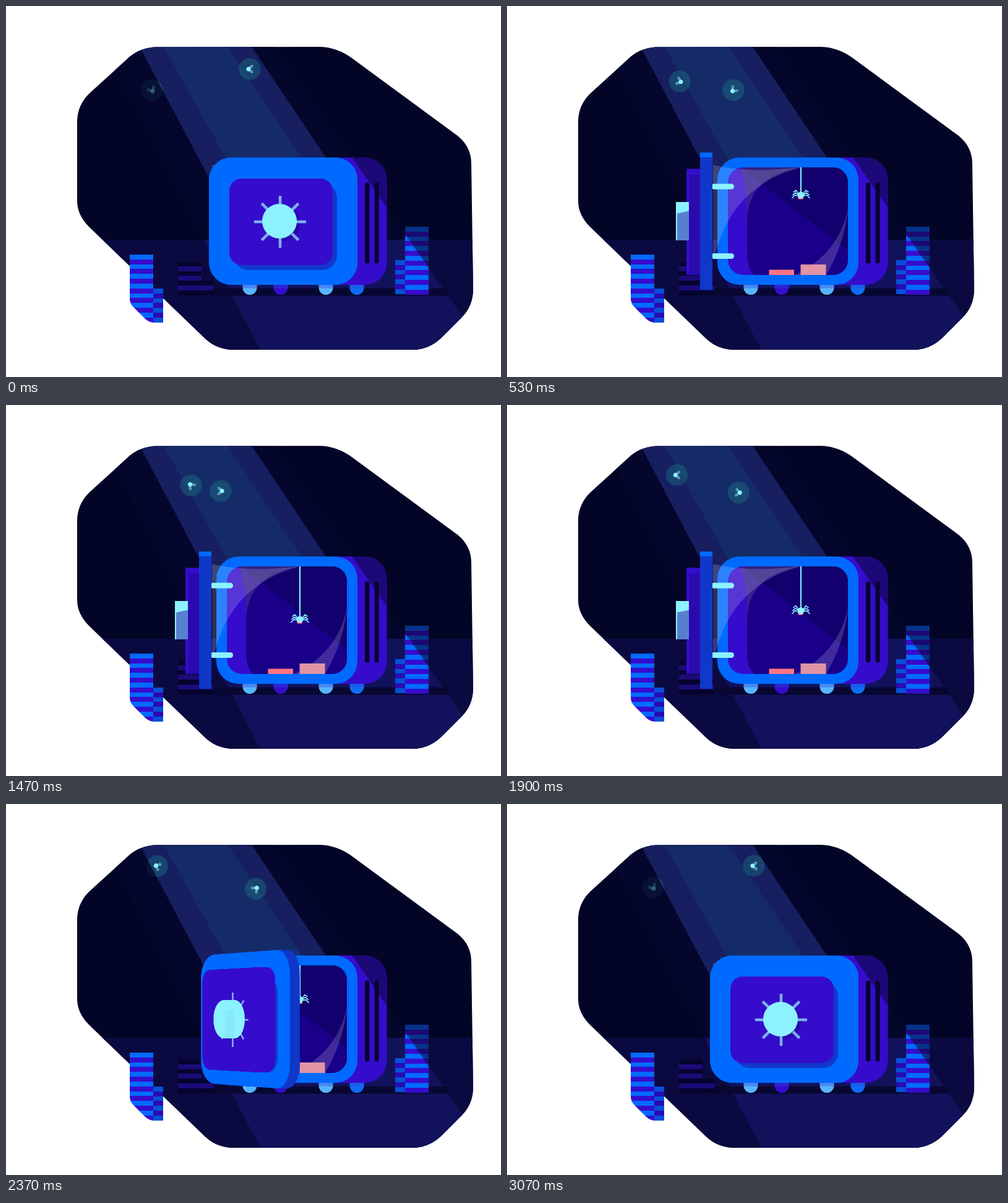
These frames come from a looping animation (800 by 600 pixels, 3100 ms). An HTML page with a canvas:

```html
<!DOCTYPE html>
<html>
<head>
<meta charset="utf-8">
<style>
html, body { margin: 0; width: 100%; height: 100%; overflow: hidden; background: #fff; }
canvas { display: block; }
</style>
</head>
<body>
<canvas id="stage" width="800" height="600"></canvas>
<script>
const ctx = document.getElementById('stage').getContext('2d');
const LOOP = 3100;
const BLUE = '#006aff', PURPLE = '#360ccc', CYAN = '#8cf2ff', NIGHT = '#05042f';

const ROOM = new Path2D('M243 66.5L508 66Q536 67 560 85L730 210Q752 228 752 255L755 460Q754 486 737 503' +
  'L703 537Q684 555 658 556H366Q340 555 322 538L134 357Q115 338 115 315V185Q116 160 134 142L200 82Q218 67 243 66.5Z');
const WIDE_BEAM = new Path2D('M157 66H435L775 556H411Z');
const BEAM = new Path2D('M216 66H397L606 378H381Z');
const CORE = new Path2D('M255 66H358L567 378H429Z');
const SHADE = new Path2D('M435 66L775 556H800V66Z');
const HOLE = new Path2D();
HOLE.roundRect(357, 261, 194, 174, 24);

function fill(path, color) {
  ctx.fillStyle = color;
  ctx.fill(typeof path === 'string' ? new Path2D(path) : path);
}

function box(x, y, w, h, color, r = 0) {
  ctx.fillStyle = color;
  ctx.beginPath();
  ctx.roundRect(x, y, w, h, r);
  ctx.fill();
}

function disc(x, y, r, color) {
  ctx.fillStyle = color;
  ctx.beginPath();
  ctx.arc(x, y, r, 0, 7);
  ctx.fill();
}

function clipped(path, draw) {
  ctx.save();
  ctx.clip(path);
  draw();
  ctx.restore();
}

function stack(x, y, w, rows, colors) {
  const h = 7.83;
  for (let i = 0; i < rows; i++) {
    const top = Math.round(y + i * h);
    box(x, top, w, Math.round(y + (i + 1) * h) - top, colors[i % 2]);
  }
}

// Smooth periodic curve through values at the key times
const KEYS = [0, 530, 930, 1470, 2240, 2570, 3070];
function curve(values, t) {
  const n = KEYS.length;
  const time = i => KEYS[(i + n) % n] + LOOP * Math.floor(i / n);
  const val = i => values[(i + n) % n];
  const slope = i => (val(i + 1) - val(i - 1)) / (time(i + 1) - time(i - 1));
  let i = n - 1;
  while (KEYS[i] > t) i--;
  const d = time(i + 1) - time(i), x = (t - time(i)) / d, y = 1 - x;
  return val(i) * (1 + 2 * x) * y * y + val(i + 1) * x * x * (3 - 2 * x) +
    d * x * y * (slope(i) * y - slope(i + 1) * x);
}

function ease(t, from, to) {
  const x = Math.min(1, Math.max(0, (t - from) / (to - from)));
  return x < .5 ? 4 * x ** 3 : 1 - 4 * (1 - x) ** 3;
}

const MOTHS = [
  { x: [236, 279, 313, 299, 253, 234, 236], y: [136, 122, 119, 130, 100, 108, 135],
    turn: [240, 200, 225, 45, 0, 90, 240] },
  { x: [394, 366, 338, 347, 397, 409, 399], y: [102, 136, 151, 139, 142, 125, 100],
    turn: [0, -45, 0, 180, 160, 90, 0] }
];

function moth(m, t) {
  ctx.save();
  ctx.translate(curve(m.x, t), curve(m.y, t));
  disc(0, 0, 17.6, 'rgba(30,115,130,.36)');
  ctx.rotate(curve(m.turn, t) * Math.PI / 180);
  for (const side of [-1, 1]) {
    fill(`M-2 0Q-1 ${side * 7} 5 ${side * 7}Q8 ${side * 2} -2 0Z`, '#5796b8');
  }
  disc(-2, 0, 3.5, CYAN);
  ctx.restore();
}

function background(t) {
  fill(ROOM, '#030527');
  clipped(ROOM, () => {
    fill(WIDE_BEAM, '#04062c');
    fill(BEAM, '#171f60');
    fill(CORE, '#152b68');
    box(100, 378, 700, 200, '#0a0a40');
    clipped(WIDE_BEAM, () => box(100, 378, 700, 200, '#12125c'));
    ctx.globalAlpha = .3;
    MOTHS.forEach(m => moth(m, t));
    ctx.globalAlpha = 1;
    clipped(BEAM, () => MOTHS.forEach(m => moth(m, t)));
  });
  box(278, 456.5, 436, 12, '#070731');
  const dim = ['#0550d8', '#2a0ab4'], dark = [NIGHT, '#1c0a78'];
  clipped(new Path2D('M200 402H238V512Q230 511 224 505L206 487Q200 481 200 473Z'),
    () => stack(200, 402, 38, 14, [BLUE, PURPLE]));
  stack(238, 457, 16, 7, dim);
  stack(278, 413, 38, 7, dark);
  stack(316, 444, 19, 3, dark);
  stack(629, 411, 16, 7, dim);
  stack(645, 357, 38, 14, [BLUE, PURPLE]);
  clipped(SHADE, () => box(645, 357, 38, 110, 'rgba(8,6,45,.55)'));
}

function spider(y) {
  ctx.strokeStyle = CYAN;
  ctx.lineWidth = 2;
  ctx.beginPath();
  ctx.moveTo(475, 261);
  ctx.lineTo(475, y);
  ctx.stroke();
  ctx.lineWidth = 1.6;
  ctx.beginPath();
  for (const side of [-1, 1]) {
    for (let i = 0; i < 3; i++) {
      ctx.moveTo(475 + side * 3, y + i - 1);
      ctx.lineTo(475 + side * (8 + i), y - 8 + 4 * i);
      ctx.lineTo(475 + side * (12.5 + i), y - 5 + 5 * i);
    }
  }
  ctx.stroke();
  box(470, y + 1, 9, 5.5, '#ff8e98', 3);
  disc(475, y - .5, 5.3, CYAN);
}

function safe(t) {
  [[394, '#58b4ff'], [444, PURPLE], [517, '#58b4ff'], [567, '#0f6cf5']].forEach(([x, color]) => {
    box(x - 11.5, 445, 23, 22, color, [0, 0, 11.5, 11.5]);
    box(x - 11.5, 450, 23, 6.5, 'rgba(40,70,220,.4)');
  });
  box(480, 245, 135.5, 206, PURPLE, 36);
  clipped(SHADE, () => box(480, 245, 135.5, 206, '#1d0878', 36));
  box(580, 285.5, 7.5, 131, NIGHT, 3.5);
  box(595.5, 285.5, 7, 131, NIGHT, 3.5);
  box(340, 245, 228, 206, BLUE, 36);
  clipped(HOLE, () => {
    fill(HOLE, PURPLE);
    fill('M376 261Q388 290 388 350V400Q388 425 400 436H552V261Z', '#1a0088');
    fill('M388 269L551 395V261H388Z', '#12006e');
    fill('M551 328Q536 402 463 436H515Q543 390 551 332Z', 'rgba(255,255,255,.17)');
    box(423.5, 426.5, 40.5, 9, '#ff7484');
    box(474.5, 418, 41, 17.5, '#e094a4');
    fill('M376 261H475Q388 275 388 350Q388 290 376 261Z', 'rgba(255,255,255,.12)');
    spider(curve([292, 306, 357, 347, 321, 310, 293], t));
  });
  fill('M333 257Q388 271 475 261Q365 290 337 400H333Z', 'rgba(255,255,255,.17)');
  box(330, 287.5, 37, 9, CYAN, 4.5);
  box(330, 400, 37, 9, CYAN, 4.5);
}

// The door is a set of flat plates: u runs from the hinge, v from the middle, z is depth.
function door(open) {
  const angle = 90 * open, s = Math.sin(angle * Math.PI / 180), c = Math.cos(angle * Math.PI / 180);
  const grow = Math.min(13 * s, 8 + 3.2 * (90 - angle)) / 103;
  const at = (u, v, z) => [328 + 4 * s + u * c - z * s, 348 + v * (1 + grow * u / 240)];

  function plate(u0, v0, u1, v1, r, z, color) {
    const k = r * .45, p = (u, v) => at(u, v, z);
    ctx.fillStyle = color;
    ctx.beginPath();
    ctx.moveTo(...p(u0 + r, v0));
    ctx.lineTo(...p(u1 - r, v0));
    ctx.bezierCurveTo(...p(u1 - k, v0), ...p(u1, v0 + k), ...p(u1, v0 + r));
    ctx.lineTo(...p(u1, v1 - r));
    ctx.bezierCurveTo(...p(u1, v1 - k), ...p(u1 - k, v1), ...p(u1 - r, v1));
    ctx.lineTo(...p(u0 + r, v1));
    ctx.bezierCurveTo(...p(u0 + k, v1), ...p(u0, v1 - k), ...p(u0, v1 - r));
    ctx.lineTo(...p(u0, v0 + r));
    ctx.bezierCurveTo(...p(u0, v0 + k), ...p(u0 + k, v0), ...p(u0 + r, v0));
    ctx.fill();
  }

  function solid(u0, v0, u1, v1, r, z0, z1, side, face) {
    if (s > .01) for (let z = z0; z < z1; z++) {
      plate(u0, v0, u1, v1, r, z, side);
      // keeps the body filled when seen edge-on
      if (c < .2) edge(u1 - r, v0, v1, z, z + 1, side);
    }
    plate(u0, v0, u1, v1, r, z1, face);
  }

  function edge(u, v0, v1, z0, z1, color, slant = 0) {
    ctx.fillStyle = color;
    ctx.beginPath();
    ctx.moveTo(...at(u, v0, z0));
    ctx.lineTo(...at(u, v0 + slant, z1));
    ctx.lineTo(...at(u, v1, z1));
    ctx.lineTo(...at(u, v1, z0));
    ctx.fill();
  }

  const edgeOn = s ** 12;
  solid(0, -103, 240, 103, 36, 0, 20, '#1038c8', BLUE);
  ctx.globalAlpha = edgeOn;
  edge(240, -103, 103, 0, 20, '#1038c8');
  edge(240, -103, -96, 0, 20, BLUE);
  ctx.globalAlpha = 1;

  const half = 70 + 11 * s;
  plate(40, -61, 207, 79, 24, 20, '#1238cc');
  solid(33, -half + 1, 200, half + 1, 20, 20, 42, PURPLE, PURPLE);
  ctx.globalAlpha = edgeOn;
  edge(200, -half + 10, half, 20, 37, '#2a09ae');
  ctx.globalAlpha = 1;

  plate(92, -24, 148, 32, 28, 42, '#2a09ae');
  ctx.strokeStyle = '#7db0ee';
  ctx.lineWidth = 4.5 * c + .001;
  ctx.beginPath();
  for (let i = 0; i < 8; i++) {
    const x = Math.cos(i * Math.PI / 4), y = Math.sin(i * Math.PI / 4);
    ctx.moveTo(...at(115 + 27 * x, 1 + 27 * y, 42));
    ctx.lineTo(...at(115 + 42 * x, 1 + 42 * y, 42));
  }
  ctx.stroke();
  const knob = 28 + 2 * s;
  solid(86, -knob, 142, knob, 28, 38, 59, CYAN, CYAN);
  ctx.globalAlpha = edgeOn;
  edge(114, -16, 30, 38, 57, '#587fce', 4);
  ctx.globalAlpha = 1;
}

function frame(now) {
  const t = now % LOOP;
  ctx.clearRect(0, 0, 800, 600);
  background(t);
  safe(t);
  door(ease(t, 10, 500) - ease(t, 2170, 2600));
  requestAnimationFrame(frame);
}
requestAnimationFrame(frame);
</script>
</body>
</html>
```
